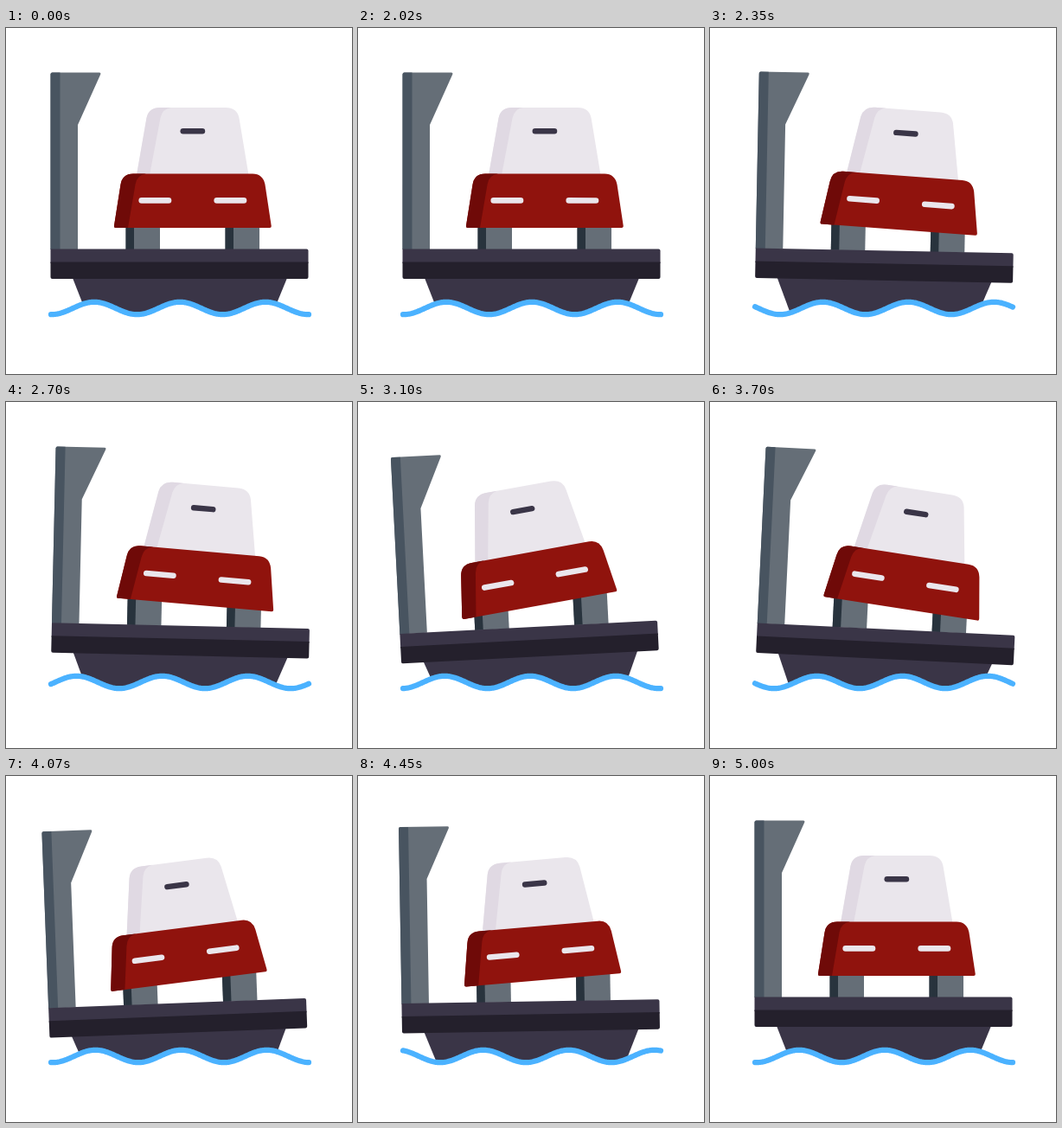
An HTML page with a canvas that plays this animation: 400x400 px, repeating every 5020 ms.

```html
<!DOCTYPE html>
<html>
<head>
<meta charset="utf-8">
<title>Car ferry</title>
<style>
html, body { margin: 0; height: 100%; overflow: hidden; background: #fff; }
canvas { display: block; }
</style>
</head>
<body>
<canvas id="stage" width="400" height="400"></canvas>
<script>
const ctx = document.getElementById('stage').getContext('2d');
const LOOP = 5020, REST = 2000, RAD = Math.PI / 180;

// Rocking keyframes: time in ms after the rest, tilts in degrees, sinking in px
const TIMES = [0, 600, 1100, 1650, 2200, 2750, 3000];
const TILT = [0, 1.8, -2.95, 2.9, -3, 1.7, 0];
const LEAN = [0, 5, -7.3, 6.4, -7, 0, 0];
const SINK = [0, 3, 4.7, 7, 7, 2.6, 0];

const ease = p => p * p * (3 - 2 * p);

function track(values, t) {
  let i = 0;
  while (i < TIMES.length - 2 && t > TIMES[i + 1]) i++;
  const p = (t - TIMES[i]) / (TIMES[i + 1] - TIMES[i]);
  return values[i] + (values[i + 1] - values[i]) * ease(p);
}

// The wave slides right, left and right again, one second each
function waveShift(t) {
  const leg = Math.min(2, Math.floor(t / 1000));
  const p = ease(t / 1000 - leg);
  return 100 * (leg === 1 ? 1 - p : p);
}

function fill(color, path) {
  ctx.fillStyle = color;
  ctx.fill(new Path2D(path));
}

function box(color, x, y, w, h) {
  ctx.fillStyle = color;
  ctx.fillRect(x, y, w, h);
}

function bar(color, x1, x2, y, width) {
  ctx.strokeStyle = color;
  ctx.lineWidth = width;
  ctx.beginPath();
  ctx.moveTo(x1, y);
  ctx.lineTo(x2, y);
  ctx.stroke();
}

function rotate(degrees, x, y) {
  ctx.translate(x, y);
  ctx.rotate(degrees * RAD);
  ctx.translate(-x, -y);
}

function drawBoat() {
  fill('#3a3547', 'M77 289H325L302 345H99Z');
  fill('#656e77', 'M53.5 51.5H108Q110 51.5 109.3 53.5L83 112V256H51.5V53.5Q51.5 51.5 53.5 51.5Z');
  fill('#485460', 'M53.5 51.5H62.5V256H51.5V53.5Q51.5 51.5 53.5 51.5Z');
  for (const x of [138.5, 253.5]) {
    box('#656e77', x, 208, 39.5, 48);
    box('#28333d', x, 208, 9.5, 48);
  }
  fill('#3a3547', 'M51.5 255.5H347.5Q349.5 255.5 349.5 257.5V272H51.5Z');
  fill('#24202c', 'M51.5 270.5H349.5V288Q349.5 290 347.5 290H53.5Q51.5 290 51.5 288Z');
}

function drawCar() {
  fill('#eae6ec', 'M151 170L162.5 104Q165 92 178 92H254Q267 92 269.5 104L280.5 170Z');
  fill('#e0d9e3', 'M151 170L162.5 104Q165 92 178 92H191Q181 93 178.5 104L166 170Z');
  fill('#90130d', 'M127 231Q124.7 231 125 228.5L132.5 181Q134.5 168.5 147 168.5H285Q297 168.5 299.5 181L306.7 228.5Q307 231 304.7 231Z');
  fill('#6f0a08', 'M127 231Q124.7 231 125 228.5L132.5 181Q134.5 168.5 147 168.5H162Q151.5 169.5 149.5 181L141 231Z');
  bar('#3a3547', 204.7, 227, 119.2, 6.4);
  bar('#eae6ec', 156.7, 188, 199.4, 6.6);
  bar('#eae6ec', 243.7, 275, 199.4, 6.6);
}

function drawWater(shift) {
  const wave = new Path2D();
  for (let x = 52; x <= 350; x++) {
    wave.lineTo(x, 324 - 7.2 * Math.cos((x - 102 - shift) / 99 * 2 * Math.PI));
  }
  // White water hides the submerged hull
  const water = new Path2D(wave);
  water.lineTo(350, 400);
  water.lineTo(52, 400);
  ctx.fillStyle = '#fff';
  ctx.fill(water);
  ctx.strokeStyle = '#4bb2ff';
  ctx.lineWidth = 6.2;
  ctx.stroke(wave);
}

function draw(now) {
  const t = Math.min(3000, Math.max(0, now % LOOP - REST));
  box('#fff', 0, 0, 400, 400);
  ctx.lineCap = ctx.lineJoin = 'round';
  ctx.save();
  ctx.translate(0, track(SINK, t));
  rotate(track(TILT, t), 200, 320);
  drawBoat();
  rotate(track(LEAN, t), 216, 240);
  drawCar();
  ctx.restore();
  drawWater(waveShift(t));
}

const start = performance.now();
function tick() {
  draw(performance.now() - start);
  requestAnimationFrame(tick);
}
tick();
</script>
</body>
</html>
```
